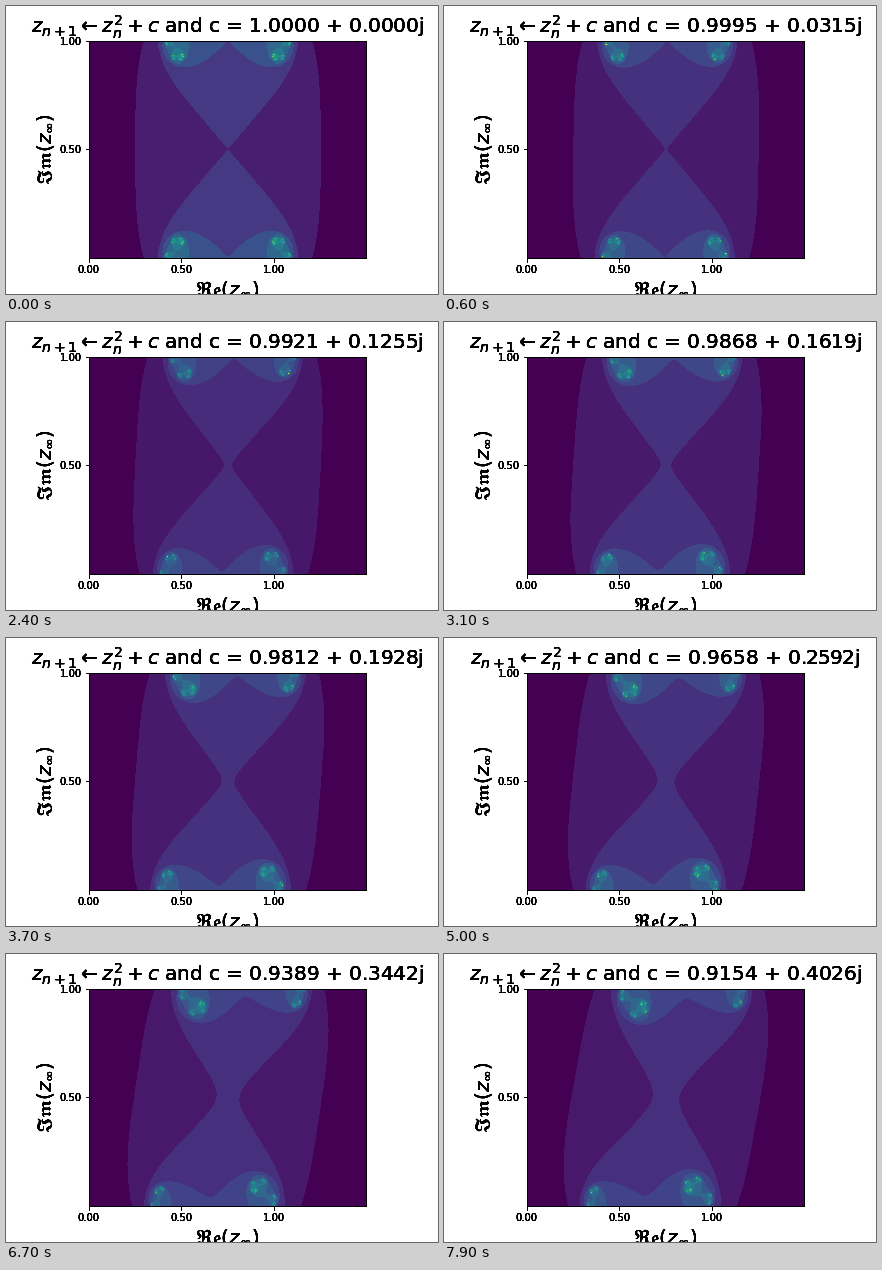
These frames come from a looping animation (432 by 288 pixels, 8000 ms). A matplotlib script:

```python
import numpy as np
import matplotlib.pyplot as plt
from matplotlib.animation import FuncAnimation

W, H, DPI = 432, 288, 72
FRAMES, INTERVAL = 80, 100
STEP = 2 * np.pi / 1198          # turn of c per frame
BOX = [82.8 / W, 36 / H, 277.4 / W, 217.44 / H]
LAYERS = 6                       # stacked text gives the heavy edges

plt.rcParams.update({
    "font.family": "DejaVu Sans",
    "font.size": 10,
    "mathtext.fontset": "dejavusans",
})

# z and -z escape alike, so only half of the plane is computed.
NX, NY = 1280, 1000
xs = np.linspace(-1.5, 1.5, NX)
ys = np.linspace(-1, 1, NY)[:NY // 2]
SQUARES = ((xs[None, :] + 1j * ys[:, None]) ** 2).ravel()


def escape_counts(c, limit=50):
    """Steps until |z| exceeds 2 under z -> z^2 + c."""
    n = np.ones(SQUARES.size)
    live = np.arange(SQUARES.size)
    z = SQUARES + c
    for _ in range(limit):
        inside = z.real ** 2 + z.imag ** 2 <= 4
        live, z = live[inside], z[inside]
        if not live.size:
            break
        n[live] += 1
        z = z * z + c
    half = n.reshape(NY // 2, NX)
    return np.vstack([half, half[::-1, ::-1]])


def add_axes(fig, layer):
    ax = fig.add_axes(BOX, label=f"layer{layer}")
    ax.patch.set_visible(False)
    ax.set(xlim=(0, 1.5), ylim=(0, 1))
    ax.set_xticks([0, 0.5, 1], ["0.00", "0.50", "1.00"])
    ax.set_yticks([0.5, 1], ["0.50", "1.00"])
    ax.set_xlabel(r"$\mathfrak{Re}(z_\infty)$", fontsize=20)
    ax.set_ylabel(r"$\mathfrak{Im}(z_\infty)$", fontsize=20)
    return ax


fig = plt.figure(figsize=(W / DPI, H / DPI), dpi=DPI, facecolor="white")
axes = [add_axes(fig, i) for i in range(LAYERS)]
image = axes[0].imshow(escape_counts(1), cmap="viridis", aspect="auto",
                       interpolation="nearest", extent=(0, 1.5, 0, 1))
titles = [fig.text(BOX[0] + BOX[2] / 2, 1 - 27 / H, "", fontsize=20,
                   ha="center", va="baseline") for _ in range(LAYERS)]


def update(i):
    c = np.exp(1j * STEP * i)
    n = escape_counts(c)
    image.set_data(n)
    image.set_clim(n.min(), n.max())
    label = (r"$z_{n+1} \leftarrow z_n^2 + c$"
             f" and c = {c.real:.4f} + {c.imag:.4f}j")
    for title in titles:
        title.set_text(label)
    return image, *titles


anim = FuncAnimation(fig, update, frames=FRAMES, interval=INTERVAL,
                     init_func=lambda: update(0), repeat=True,
                     repeat_delay=0, blit=False)
plt.show()
```
